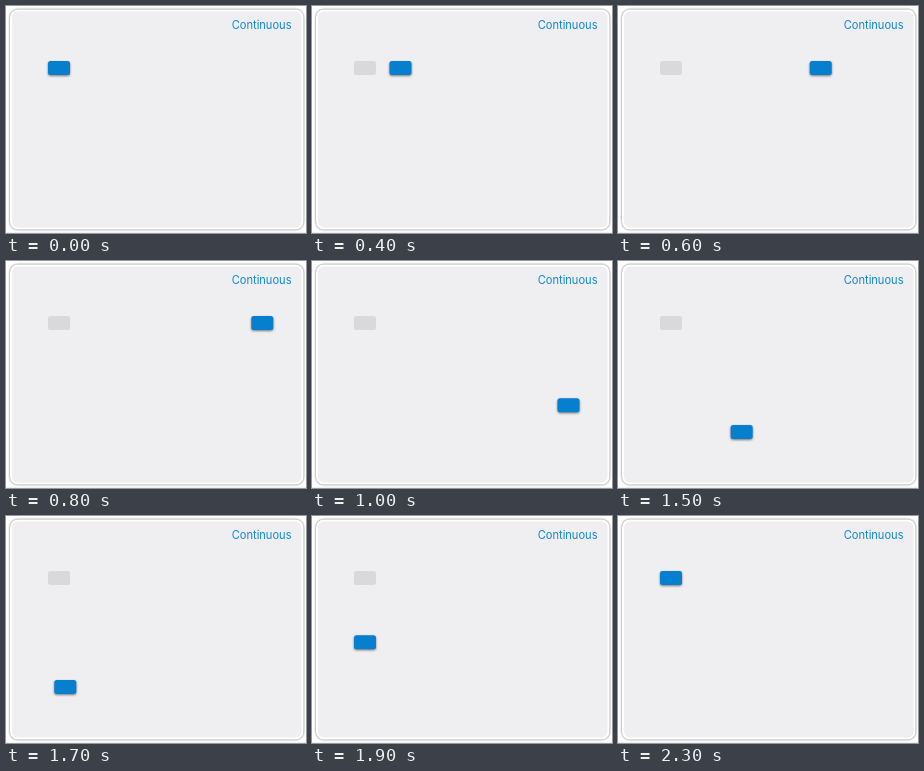
Animation, 300 px wide and 227 px high, one loop 2.4 s. Source, as an HTML page:

```html
<!DOCTYPE html>
<html lang="en">
<head>
<meta charset="utf-8">
<title>Continuous</title>
<style>
  html, body { margin: 0; width: 100%; height: 100%; overflow: hidden; background: #fff; }
  svg { display: block; width: 300px; height: 227px; }
  text { font: 11.1px Inter, Roboto, sans-serif; fill: #1289d0; text-anchor: end; }
  .card { fill: #efeef1; stroke: #fff; stroke-width: 2; filter: drop-shadow(0 .7px .8px rgba(0, 0, 0, .6)); }
  #block { fill: #0680ce; filter: drop-shadow(0 1px 1px rgba(0, 0, 0, .5)); }
</style>
</head>
<body>
<svg viewBox="0 0 300 227">
  <rect y="226" width="300" height="1" fill="#f0f0f0"/>
  <rect class="card" x="5" y="4.5" width="291.5" height="218" rx="7"/>
  <text x="285.5" y="22.5">Continuous</text>
  <rect x="42" y="55" width="22" height="14" rx="2.5" fill="#d9d9dc"/>
  <rect id="block" width="22" height="14" rx="2.5"/>
</svg>
<script>
const LOOP = 2400;
const LEFT = 42, RIGHT = 245.5, TOP = 55, BOTTOM = 164;
const block = document.getElementById('block');

// Quadratic ease-in-out between two times, 0 before and 1 after
function ease(t, start, end) {
  const u = Math.min(1, Math.max(0, (t - start) / (end - start)));
  return u < 0.5 ? 2 * u * u : 1 - 2 * (1 - u) ** 2;
}

function draw(now) {
  const t = now % LOOP;
  const across = ease(t, 228, 814) - ease(t, 1102, 1786);
  const down = ease(t, 814, 1102) - ease(t, 1786, 2040);
  block.setAttribute('x', LEFT + (RIGHT - LEFT) * across);
  block.setAttribute('y', TOP + (BOTTOM - TOP) * down);
}

const begin = performance.now();
function tick() {
  draw(performance.now() - begin);
  requestAnimationFrame(tick);
}
tick();
</script>
</body>
</html>
```
